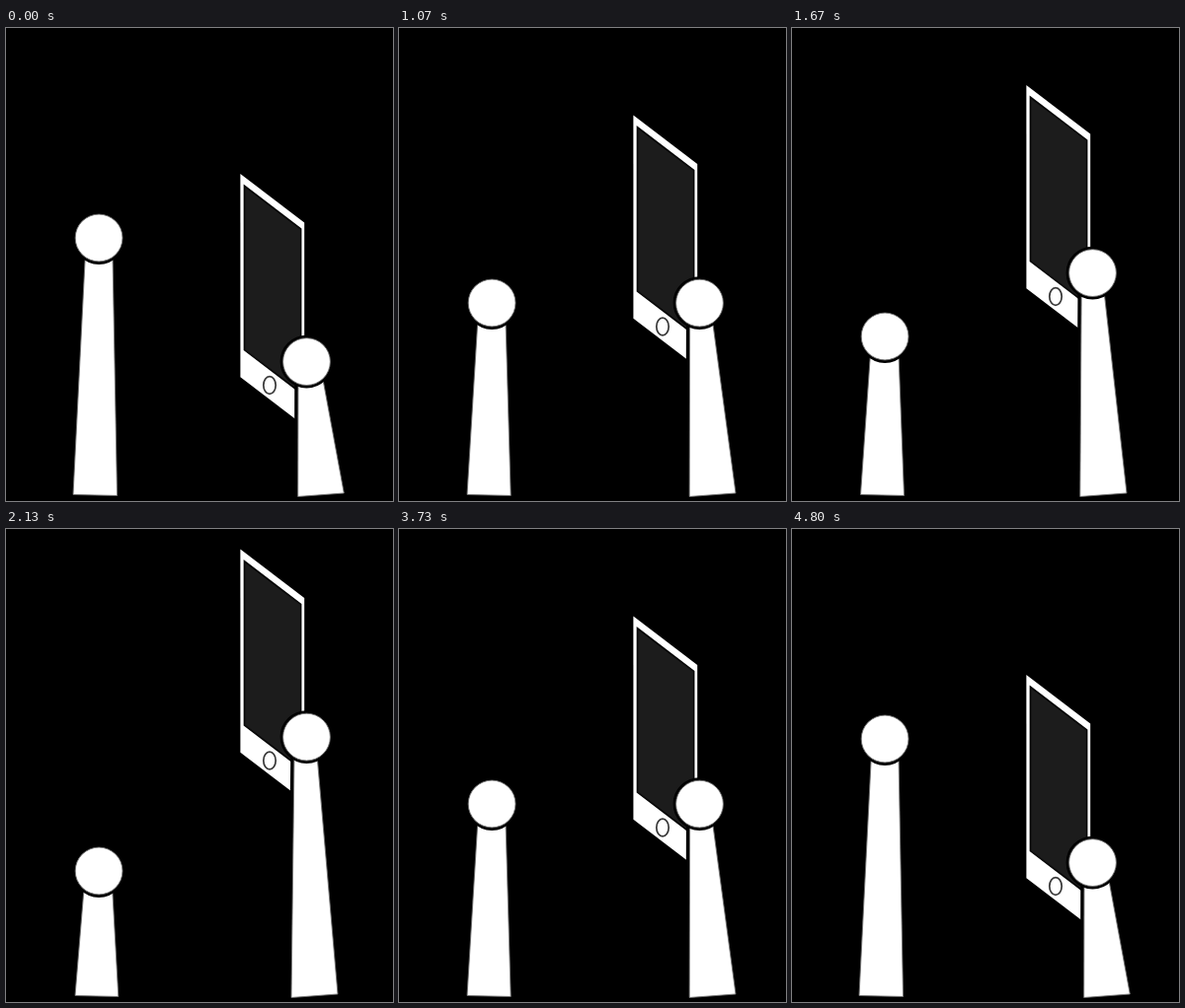
Write an HTML page that moves like this. It is 392x480 px and loops after 5340 ms.

```html
<!DOCTYPE html>
<html lang="en">
<head>
<meta charset="utf-8">
<title>Phone and hands</title>
<style>
  html, body { margin: 0; width: 100%; height: 100%; overflow: hidden; background: #000; }
  svg { display: block; width: 392px; height: 480px; }
  .halo { fill: #000; stroke: #000; stroke-width: 7.4; }
  circle.halo { stroke-width: 6; }
  .skin { fill: #fff; stroke: #777; stroke-width: 0.9; }
</style>
</head>
<body>
<svg viewBox="0 0 392 480">
  <g id="phone">
    <path fill="#fff" d="M237.4 0L302.2 49.5V255.7L237.4 206.2Z"/>
    <path fill="#1c1c1c" stroke="#080808" stroke-width="1.7" d="M241.5 12.2L298.6 55.8V222.3L241.5 178.7Z"/>
    <ellipse cx="267" cy="214.5" rx="6.2" ry="8.8" fill="none" stroke="#383838" stroke-width="1.7"/>
  </g>
  <path class="armL halo"/>
  <path class="armL skin"/>
  <circle class="handL halo" cx="94.1" r="23.9"/>
  <circle class="handL skin" cx="94.1" r="23.9"/>
  <path class="armR halo"/>
  <path class="armR skin"/>
  <circle class="handR halo" cx="304.5" r="23.9"/>
  <circle class="handR skin" cx="304.5" r="23.9"/>
</svg>
<script>
const LOOP = 5340;

// phone: top of the phone; hand: left hand height
// left, right: arm x positions [top left, top right, bottom right, bottom left]
const poses = [
  { phone: 148, hand: 213, left: [80.3, 108, 112.5, 68], right: [296, 321, 342.3, 295.7] },
  { phone: 118, hand: 246, left: [80, 108, 112.8, 68.5], right: [295.5, 319, 341.8, 295.2] },
  { phone: 88.5, hand: 279, left: [79.8, 108, 113.2, 69], right: [294.6, 317.5, 341, 294.2] },
  { phone: 58, hand: 313, left: [79.4, 108, 113.5, 69.5], right: [293.2, 316, 339, 291.8] },
  { phone: 20.5, hand: 347, left: [79, 107.7, 113.8, 70], right: [292, 315, 336, 289] }
];

// [start time, pose]
const steps = [[0, 0], [530, 1], [1070, 2], [1600, 3], [2130, 4],
               [3200, 3], [3730, 2], [4270, 1], [4800, 0]];

function set(selector, name, value) {
  document.querySelectorAll(selector).forEach(node => node.setAttribute(name, value));
}

function setArm(selector, [a, b, c, d], top, rightEnd, leftEnd) {
  set(selector, "d", `M${a} ${top}L${b} ${top}L${c} ${rightEnd}L${d} ${leftEnd}Z`);
}

function draw(ms) {
  const t = ms % LOOP;
  const pose = poses[steps.filter(s => s[0] <= t).pop()[1]];
  const rightY = pose.phone + 190.6;
  set("#phone", "transform", `translate(0 ${pose.phone})`);
  set(".handL", "cy", pose.hand);
  set(".handR", "cy", rightY);
  setArm(".armL", pose.left, pose.hand + 18, 474.5, 473.5);
  setArm(".armR", pose.right, rightY + 18, 472, 475.5);
}

const start = performance.now();
function tick() {
  draw(performance.now() - start);
  requestAnimationFrame(tick);
}
tick();
</script>
</body>
</html>
```
